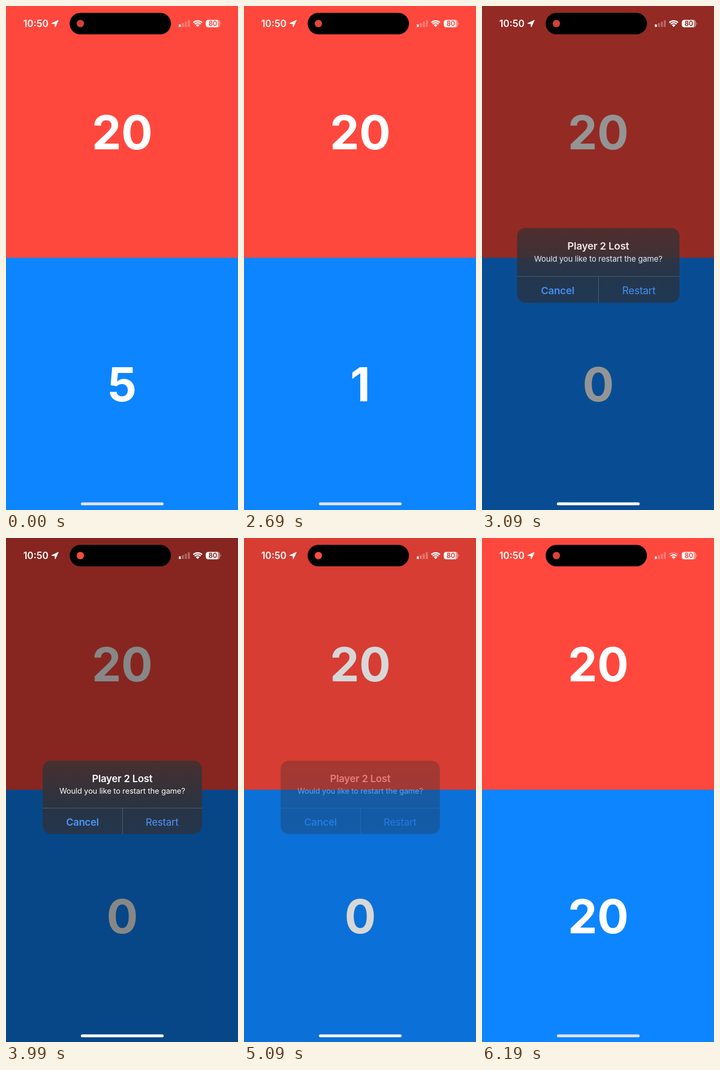
An HTML page that plays this animation: 443 by 960 pixels, repeating every 6290 ms.

```html
<!DOCTYPE html>
<html lang="en">
<head>
<meta charset="utf-8">
<title>Score counter</title>
<style>
  html, body { margin: 0; width: 100%; height: 100%; overflow: hidden; background: #000; }
  svg { display: block; width: 100vw; height: 100vh; font-family: Inter, sans-serif; fill: #fff; }
  .score { font-size: 89px; font-weight: 700; }
  .mid { text-anchor: middle; }
  .bold { font-weight: 600; }
  .label { font-size: 19px; letter-spacing: -.2px; }
  .blue { fill: #4c96fd; }
  .faint { opacity: .3; }
  .arc { fill: none; stroke: #fff; stroke-width: 2.5; }
</style>
</head>
<body>
<svg viewBox="0 0 443 960">
  <defs>
    <linearGradient id="glass" x2="0" y2="1">
      <stop stop-color="#482f2f"/>
      <stop offset=".4" stop-color="#35323a"/>
      <stop offset=".65" stop-color="#283444"/>
      <stop offset="1" stop-color="#24364e"/>
    </linearGradient>
    <clipPath id="panel"><rect x="70" y="424" width="304" height="140" rx="16"/></clipPath>
  </defs>

  <rect width="443" height="480" fill="#ff483d"/>
  <rect y="479.5" width="443" height="481" fill="#0d85ff"/>
  <text class="score mid" x="222" y="273">20</text>
  <text class="score mid" x="222" y="753" id="score">5</text>
  <rect id="dim" width="443" height="960" fill="#000"/>

  <g id="alert">
    <g clip-path="url(#panel)">
      <rect x="70" y="424" width="304" height="140" fill="url(#glass)"/>
      <path d="M70 514.5H374M222.5 515V564" stroke="#fff" stroke-opacity=".22"/>
      <rect id="press" x="222" y="515" width="152" height="49" opacity=".15"/>
    </g>
    <text class="mid label bold" x="222" y="465">Player 2 Lost</text>
    <text class="mid" x="222" y="487" font-size="14.65" letter-spacing="-.1">Would you like to restart the game?</text>
    <text class="mid label bold blue" x="146" y="548">Cancel</text>
    <text class="mid label blue" x="298" y="548">Restart</text>
  </g>

  <!-- status bar -->
  <text class="bold" x="33" y="40" font-size="18">10:50</text>
  <path d="M100 27 87 33.2 93.3 34 94 40Z" stroke="#fff" stroke-linejoin="round"/>
  <rect x="121.5" y="13" width="193.5" height="41" rx="20.5" fill="#000"/>
  <circle id="dot" cx="142" cy="33.5" r="7" fill="#ff5040"/>
  <rect x="330" y="35" width="3.8" height="5" rx="1"/>
  <g class="faint">
    <rect x="335.8" y="32.5" width="3.8" height="7.5" rx="1"/>
    <rect x="341.5" y="29.7" width="3.8" height="10.3" rx="1"/>
    <rect x="347.2" y="27" width="3.8" height="13" rx="1"/>
  </g>
  <path d="M366 40 362.4 36.4A5 5 0 0 1 369.6 36.4Z"/>
  <path class="arc" d="M360.3 34.3A8 8 0 0 1 371.7 34.3"/>
  <path class="arc" id="wave" d="M357.7 31.7A11.8 11.8 0 0 1 374.3 31.7"/>
  <g opacity=".45">
    <path d="M404.5 26.5A4.5 4.5 0 0 1 408.5 31V36A4.5 4.5 0 0 1 404.5 40.5Z"/>
    <path d="M409.6 31.2Q412.4 33.5 409.6 35.8Z"/>
  </g>
  <path d="M404.5 26.5H386A4.5 4.5 0 0 0 381.5 31V36A4.5 4.5 0 0 0 386 40.5H404.5Z"/>
  <text class="mid" id="battery" x="395" y="38.1" font-size="12.5" font-weight="700">80</text>
  <rect id="home" x="143" y="945.5" width="158" height="5.6" rx="2.8"/>
</svg>
<script>
const LOOP = 6290, STEP = 100;
const OPEN = 2932, PRESS = 4900, CLOSE = 5000, RESET = 5400, WEAK_WIFI = 5900;
const TAPS = [1300, 1700, 2100, 2400, 2800];
const $ = id => document.getElementById(id);
const set = (id, name, value) => $(id).setAttribute(name, value);

// Critically damped spring from 0 to 1
function spring(ms) {
  const x = Math.max(0, ms) * 0.0228;
  return 1 - (1 + x) * Math.exp(-x);
}

function draw(t) {
  const shown = spring(t - OPEN);
  const alpha = shown * (1 - spring(t - CLOSE));
  const scale = 1.2 - 0.2 * shown;

  $('score').textContent = t >= RESET ? 20 : 5 - TAPS.filter(tap => t >= tap).length;
  set('dim', 'opacity', alpha * 0.47);
  set('alert', 'opacity', alpha);
  set('alert', 'transform', `translate(222 494) scale(${scale}) translate(-222 -494)`);
  set('press', 'visibility', t >= PRESS && t <= CLOSE ? 'visible' : 'hidden');

  const shade = 1 - alpha * 0.47;
  set('battery', 'fill', `rgb(${[255, 72, 61].map(c => Math.round(c * shade))})`);
  const grey = Math.min(255, 225 + 55 * alpha);
  set('home', 'fill', `rgb(${grey},${grey},${Math.min(255, grey + 4)})`);
  set('dot', 'opacity', 0.82 + 0.18 * Math.sin(Math.PI * t / 1500) ** 2);
  set('wave', 'opacity', t >= WEAK_WIFI ? 0.35 : 1);
}

const start = performance.now();
function tick() {
  const t = (performance.now() - start) % LOOP;
  draw(Math.floor((t + 10) / STEP) * STEP);
  requestAnimationFrame(tick);
}
tick();
</script>
</body>
</html>
```
